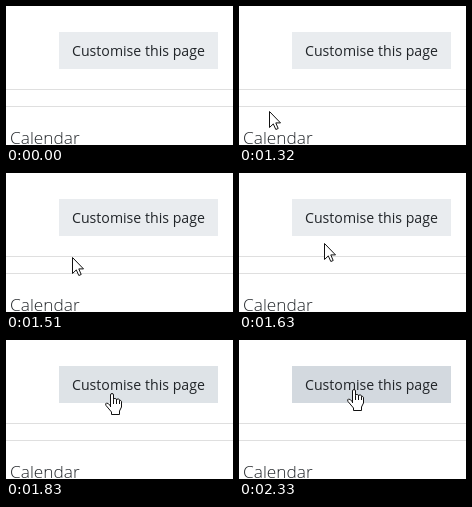
An HTML page for the animation above (4000 ms loop, 227x139 px).

```html
<!DOCTYPE html>
<html lang="en">
<head>
<meta charset="utf-8">
<title>Customise this page</title>
<style>
  html, body { margin: 0; width: 100%; height: 100%; overflow: hidden; background: #fff; }
  svg { display: block; }
  text { font-family: "Open Sans", "Noto Sans", sans-serif; }
  .label { font-size: 14.15px; fill: #212529; }
  .heading { font-size: 17.3px; font-weight: 300; fill: #212529; }
  .rule { fill: #dfdfdf; }

  .button, .cursor, .arrow, .hand { animation: 4s step-end infinite; }
  .button { fill: #e9ecef; animation-name: hover; }
  .cursor { animation-name: move; }
  .arrow { animation-name: arrow; }
  .hand { animation-name: hand; }
  .cursor path { fill: #fff; stroke: #111; stroke-linejoin: round; }
  .cursor .creases { fill: none; }

  @keyframes hover {
    0% { fill: #e9ecef; }
    45.75% { fill: #dee3e7; }
    47.5%, 100% { fill: #d3d9df; }
  }
  @keyframes arrow {
    0% { opacity: 0; }
    29.5% { opacity: 1; }
    44%, 100% { opacity: 0; }
  }
  @keyframes hand {
    0% { opacity: 0; }
    44%, 100% { opacity: 1; }
  }
  /* Pointer hotspot, sampled along its slowing path */
  @keyframes move {
    0%, 29.5% { transform: translate(3px, 121px); }
    31.25% { transform: translate(17px, 113px); }
    32.75% { transform: translate(30px, 105px); }
    34.5% { transform: translate(43px, 98px); }
    36% { transform: translate(55px, 91px); }
    37.75% { transform: translate(66px, 84px); }
    39.25% { transform: translate(76px, 77px); }
    40.75% { transform: translate(85px, 70px); }
    42.75% { transform: translate(92px, 63px); }
    44% { transform: translate(97px, 58px); }
    45.75% { transform: translate(104px, 53px); }
    47.5% { transform: translate(111px, 49px); }
    58.25%, 100% { transform: translate(113px, 49px); }
  }
</style>
</head>
<body>
<svg width="227" height="139" viewBox="0 0 227 139">
  <rect class="button" x="53" y="26" width="159" height="37"/>
  <text class="label" x="66" y="50">Customise this page</text>
  <rect class="rule" y="83" width="227" height="1"/>
  <rect class="rule" y="100" width="227" height="1"/>
  <text class="heading" x="4" y="138">Calendar</text>
  <g class="cursor">
    <path class="arrow" d="M.5 .5V16.5L4.3 12.9 6.8 18.5 9.2 17.5 6.8 11.9H11.5Z"/>
    <g class="hand">
      <g transform="translate(-5)">
        <path d="M5.5 14V2a1.5 1.5 0 0 1 3 0V6.5a1.5 1.3 0 0 1 3 .5a1.5 1.3 0 0 1 3 .5a1.4 1.4 0 0 1 2 1.5V14L14.5 18V21.5H6.5V19L1 12.5q-1-2 .5-2.5q1.8-.2 4 3Z"/>
        <path class="creases" d="M8.5 6.5V11M11.5 7V11M14.5 7.5V11"/>
      </g>
    </g>
  </g>
</svg>
</body>
</html>
```
